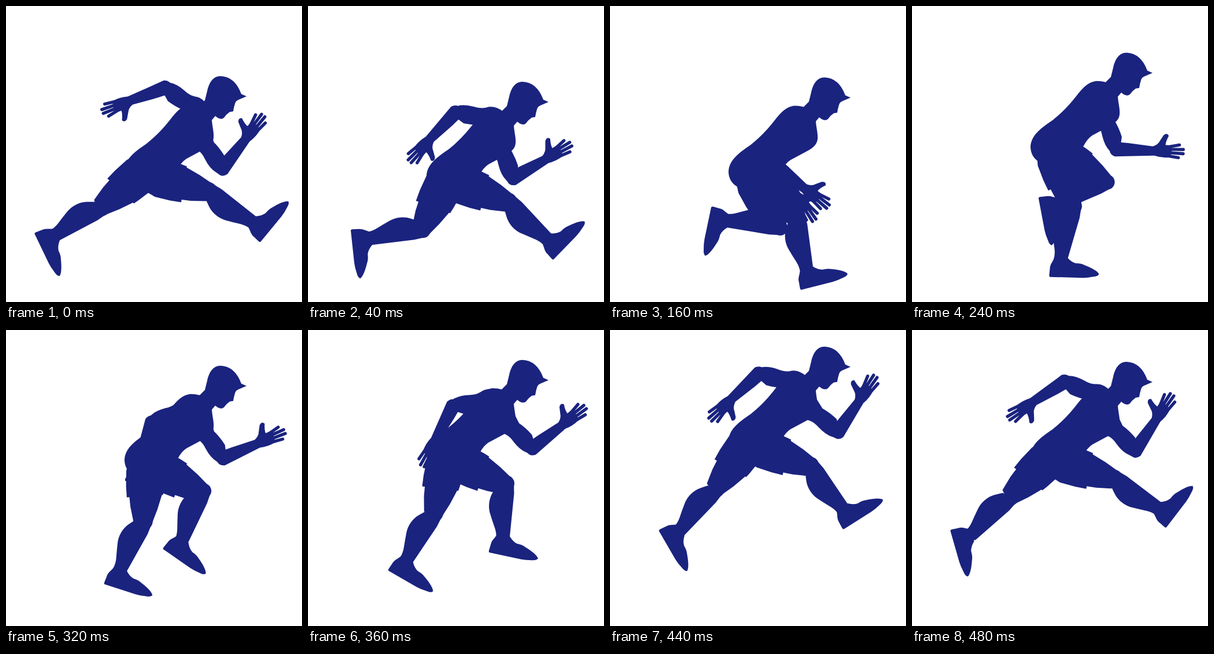
Write an HTML page without scripts that moves like this. It is 512 px wide and 512 px high and loops after 0.5 s.

```html
<!DOCTYPE html>
<html lang="en">
<head>
<meta charset="utf-8">
<title>Running figure</title>
<style>
  html, body { margin: 0; width: 100%; height: 100%; overflow: hidden; background: #fff; }
  svg { display: block; width: 100%; height: 100%; fill: #1a237e; }
  .fingers { fill: none; stroke: #1a237e; stroke-width: 5.4; stroke-linecap: round; }
</style>
</head>
<body>
<svg viewBox="0 0 512 512">
  <defs>
    <!-- Limb parts start at their joint and point along +x -->
    <path id="upper-arm" d="M10 28Q28 34 40 25Q48 20 60 20Q78 19 88 12Q97 7 98 1L90-6 68-13Q52-11 39-6L10-10Z"/>
    <g id="forearm">
      <path d="M0-11L20-10 63-6Q72-9 75-16L81-26Q87-31 90-25Q85-15 85-9L95-9Q98 2 93 12Q80 14 66 10L-2 14Q-13 10-11 0Z"/>
      <path class="fingers" d="M92-6.5L109-10M93-2L116-2.4M93 4L116 4.8M89 9.5L108 12"/>
    </g>
    <path id="thigh" d="M0-28L45-30 56-30 56-28 82-24 108-18 115-10 109 14 84 23 68 27 69 31.5 50 35.5 23 39 5 36-20 20Z"/>
    <g id="shin">
      <circle r="13"/>
      <path d="M-3-12Q8-13 17-14L95-13 102 2 98 10Q88 10 79 14Q68 19 57 23.5Q47 28 36 27.5Q26 27 18 23Q10 19 5 16Z"/>
    </g>
    <path id="foot" d="M-10-1Q0-8 13-3Q20 5 28 7Q37 7 43 10Q64 18 68 25Q67 29 58 30Q48 32 40 32L-16 31Q-18 31-18 28L-17 17Q-17 11-13 5Z"/>
  </defs>

  <g>
    <animateTransform attributeName="transform" type="translate" dur=".5s" repeatCount="indefinite"
      keyTimes="0;.08;.16;.24;.32;.4;.48;.56;.64;.72;.8;.88;.96;1"
      values="0 0;0 10;0 14;0 12;0 3;0 -18;0 -40;0 -51;0 -59;0 -69;0 -81;0 -93;0 -66;0 -66"/>

    <!-- Head and torso -->
    <path d="M371 121C358 121 351 133 348 147L344 163 335 172Q328 170 320 170C304 171 294 184 285 195C270 214 260 224 243 238C222 252 205 265 205 285Q206 302 220 310L262 312 297 282Q303 270 312 264L340 249Q358 240 359 228C360 218 357 210 356 197L362 190Q371 198 377 193Q381 187 387 183L393 182Q394 175 396 169Q397 164 402 162L416 156 407 152Q396 122 371 121Z"/>

    <!-- Arm swinging back -->
    <g transform="translate(338 202)"><g>
      <animateTransform attributeName="transform" type="rotate" dur=".5s" repeatCount="indefinite"
        keyTimes="0;.08;.16;.24;.32;.4;.48;.56;.64;.72;.8;.88;.96;1"
        values="65.5;79;93.5;110;126;138;148;158;168;180;192;202.5;212;212"/>
      <use href="#upper-arm"/>
      <g transform="translate(86)"><g>
        <animateTransform attributeName="transform" type="rotate" dur=".5s" repeatCount="indefinite"
          keyTimes="0;.08;.16;.24;.32;.4;.48;.56;.64;.72;.8;.88;.96;1"
          values="-118.5;-110;-101.5;-95;-88;-78;-68;-62;-60;-63;-67;-66;-65;-65"/>
        <use href="#forearm"/>
      </g></g>
    </g></g>

    <!-- Arm swinging forward -->
    <g transform="translate(338 202)"><g>
      <animateTransform attributeName="transform" type="rotate" dur=".5s" repeatCount="indefinite"
        keyTimes="0;.08;.16;.24;.32;.4;.48;.56;.64;.72;.8;.88;.96;1"
        values="224.5;199;174;150;126;101;80;70.5;65;55.5;49;50;57;57"/>
      <use href="#upper-arm"/>
      <g transform="translate(86)"><g>
        <animateTransform attributeName="transform" type="rotate" dur=".5s" repeatCount="indefinite"
          keyTimes="0;.08;.16;.24;.32;.4;.48;.56;.64;.72;.8;.88;.96;1"
          values="-64.5;-65;-66;-68;-70;-73.5;-77.5;-82.5;-88;-93;-99;-106;-113.5;-113.5"/>
        <use href="#forearm"/>
      </g></g>
    </g></g>

    <!-- Leg landing and pushing off -->
    <g transform="translate(250 285)"><g>
      <animateTransform attributeName="transform" type="rotate" dur=".5s" repeatCount="indefinite"
        keyTimes="0;.08;.16;.24;.32;.4;.48;.56;.64;.72;.8;.88;.96;1"
        values="21;26;32;39;48;61.5;76;87.5;98;109;120;131;141;141"/>
      <use href="#thigh"/>
      <g transform="translate(106 -6)"><g>
        <animateTransform attributeName="transform" type="rotate" dur=".5s" repeatCount="indefinite"
          keyTimes="0;.08;.16;.24;.32;.4;.48;.56;.64;.72;.8;.88;.96;1"
          values="16.3;20;24;29;33.4;32.5;29.3;25;20.4;14;7.6;2;-3;-3"/>
        <use href="#shin"/>
        <g transform="translate(95)"><g>
          <animateTransform attributeName="transform" type="rotate" dur=".5s" repeatCount="indefinite"
            keyTimes="0;.08;.16;.24;.32;.4;.48;.56;.64;.72;.8;.88;.96;1"
            values="-89;-93;-95;-95.5;-97;-101;-105;-105;-102;-94.5;-84;-74.5;-65;-65"/>
          <use href="#foot"/>
        </g></g>
      </g></g>
    </g></g>

    <!-- Leg lifting and reaching forward -->
    <g transform="translate(250 285)"><g>
      <animateTransform attributeName="transform" type="rotate" dur=".5s" repeatCount="indefinite"
        keyTimes="0;.08;.16;.24;.32;.4;.48;.56;.64;.72;.8;.88;.96;1"
        values="146;122.5;102;84.5;69;51.5;37.7;34;33;31;28.3;25.7;22.8;22.8"/>
      <use href="#thigh"/>
      <g transform="translate(106 -6)"><g>
        <animateTransform attributeName="transform" type="rotate" dur=".5s" repeatCount="indefinite"
          keyTimes="0;.08;.16;.24;.32;.4;.48;.56;.64;.72;.8;.88;.96;1"
          values="4.8;49.5;83.6;107;120;124;119;103;82.4;64.5;47.3;30;13.6;13.6"/>
        <use href="#shin"/>
        <g transform="translate(93)"><g>
          <animateTransform attributeName="transform" type="rotate" dur=".5s" repeatCount="indefinite"
            keyTimes="0;.08;.16;.24;.32;.4;.48;.56;.64;.72;.8;.88;.96;1"
            values="-88;-89.5;-90;-89.5;-88;-82.5;-78;-78.5;-81;-84;-87;-88.5;-90;-90"/>
          <use href="#foot"/>
        </g></g>
      </g></g>
    </g></g>
  </g>
</svg>
</body>
</html>
```
